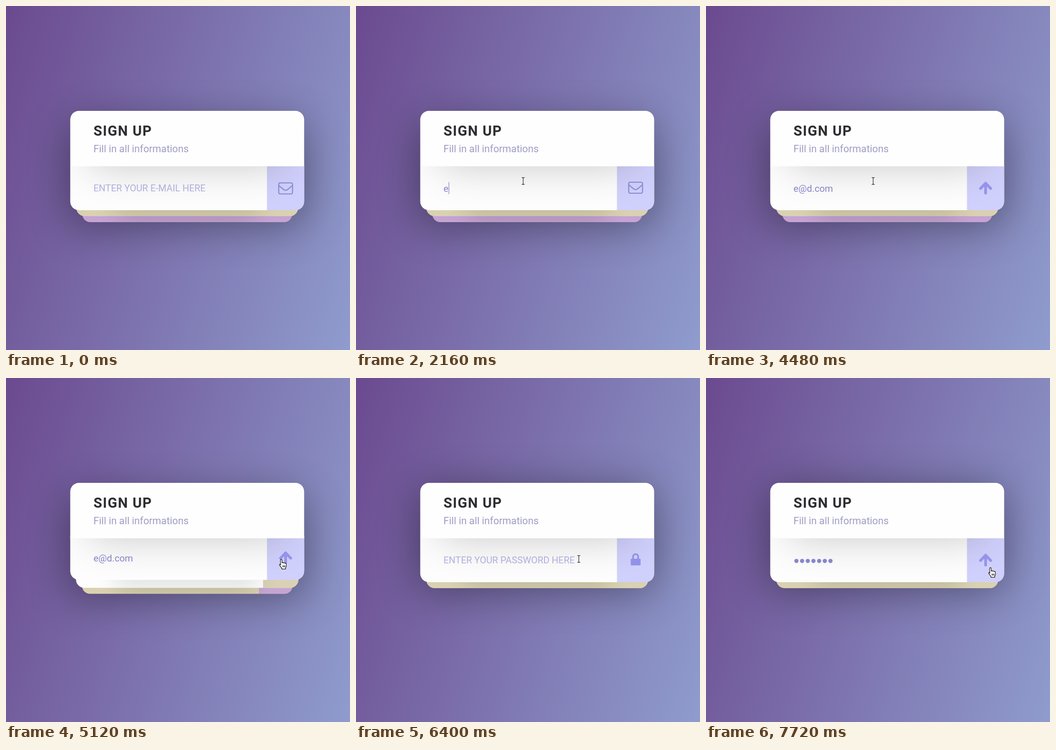
An HTML page that plays this animation: 748x748 px, repeating every 8000 ms.

```html
<!DOCTYPE html>
<html lang="en">
<head>
<meta charset="utf-8">
<title>Sign up form</title>
<style>
  html, body { margin: 0; width: 100%; height: 100%; overflow: hidden; }
  body { background: linear-gradient(107deg, #6b4a8f, #8f9ccd); }
  svg { display: block; width: 100vw; height: 100vh; }
  text { font-family: Roboto, sans-serif; font-size: 20.32px; white-space: pre; }
  .title { font-size: 30.48px; font-weight: 700; letter-spacing: 1.5px; fill: #2d2d31; }
  .sub { font-size: 21.7px; fill: #9f9dc5; }
  .hint { fill: #b6b3e6; }
  .value { fill: #8c88d0; }
  .arrow { fill: none; stroke: #9996ef; stroke-width: 6; stroke-linecap: round; stroke-linejoin: round; }
  .line { fill: none; stroke: #8b90d2; stroke-width: 2.4; }
</style>
</head>
<body>
<svg viewBox="0 0 748 748">
  <defs>
    <filter id="wide" filterUnits="userSpaceOnUse" x="-60" y="0" width="860" height="748"><feGaussianBlur stdDeviation="47"/></filter>
    <filter id="mid" filterUnits="userSpaceOnUse" x="0" y="60" width="800" height="480"><feGaussianBlur stdDeviation="44"/></filter>
    <filter id="soft" filterUnits="userSpaceOnUse" x="-300" y="-150" width="600" height="260"><feGaussianBlur stdDeviation="26"/></filter>
    <!-- panel space: origin at the middle of its bottom edge -->
    <path id="shape" d="M-254.3-96.2H254.3V-19a19 19 0 0 1-19 19H-235.3a19 19 0 0 1-19-19z"/>
    <clipPath id="panelClip"><use href="#shape"/></clipPath>
    <clipPath id="frontClip"><use href="#shape" transform="translate(394 444)"/></clipPath>
    <clipPath id="iconClip"><rect x="173.5" y="-96" width="81" height="96"/></clipPath>
    <g id="up" class="arrow"><path d="M0 10.2V-11M-11 .3L0-11.3 11 .3"/></g>
    <g id="mail" class="line"><rect x="-15" y="-12" width="30" height="24" rx="3"/><path d="M-15-6.5Q-10-2-4 2.6 0 5.6 4 2.6 10-2 15-6.5"/></g>
    <g id="lock"><rect x="-10.6" y="-3.6" width="21.4" height="14.4" rx="1.6" fill="#9493ea"/><path d="M-5.4-3V-8.2a5.4 5.4 0 0 1 10.8 0V-3" fill="none" stroke="#9493ea" stroke-width="3.7"/></g>
  </defs>

  <rect id="cardShadow" x="140" width="508" height="216" filter="url(#wide)" opacity=".42"/>
  <g id="panels"></g>
  <g clip-path="url(#frontClip)"><rect x="182" y="228" width="424" height="120" filter="url(#mid)" opacity=".21"/></g>
  <path d="M139.7 348.4V247a19 19 0 0 1 19-19H629.3a19 19 0 0 1 19 19V348.4z" fill="#fefefe"/>
  <text class="title" x="190.3" y="282.2">SIGN UP</text>
  <text class="sub" x="190.3" y="317.7">Fill in all informations</text>

  <g id="cursor">
    <path id="pointer" d="M0 0V17l4-3.7 2.6 6 2.6-1.1-2.6-5.8h5.4z" fill="#111" stroke="#fff"/>
    <path id="beam" d="M-3.2-7.3H-1Q0-7.3 0-6.3V6.3Q0 7.3-1 7.3H-3.2M3.2-7.3H1Q0-7.3 0-6.3M0 6.3Q0 7.3 1 7.3H3.2" fill="none" stroke-width="1.2"/>
    <path id="hand" d="M-2.2 12.6V2a1.7 1.7 0 0 1 3.4 0V8.5q0-1.6 1.7-1.6t1.6 1.8q.2-1.3 1.6-1.2t1.5 1.8q.3-1 1.4-.9t1.4 1.8v4.6q0 2.4-1.6 4.2v2.4h-8.2v-2l-4.6-6q-1-1.6.2-2.4t2.4.4zM2.9 13.5v4M5.2 13.5v4M7.5 13.5v4" fill="#fff" stroke="#111" stroke-width="1.2" stroke-linejoin="round"/>
  </g>
</svg>
<script>
const LOOP = 8000;
const SWAP = [5092, 5270];
const EMAIL = 'e@d.com';
const WHITE = [252, 253, 252], LILAC = [208, 208, 252], SAND = [217, 209, 177], PINK = [197, 163, 211];
const emailKeys = [2000, 2800, 3600, 3700, 3800, 3900, 4000];
const passKeys = [6520, 6680, 6800, 6920, 7080, 7160, 7240];
const caretOn = [[80, 580], [1080, 1600], [2000, 2480], [2800, 3280], [3600, 4480], [5920, 6400], [6520, 7720]];
const path = [
  [80, 408, -30], [680, 363.5, 383], [1080, 363.5, 383], [1240, 363.5, 380.5],
  [4660, 363.5, 380.5], [5080, 599, 394], [5160, 599, 394], [5260, 594.5, 393.5],
  [5700, 594.5, 393.5], [5720, 597, 389], [5900, 484.5, 393.5],
  [7390, 484.5, 393.5], [7720, 619, 412]
];

const $ = id => document.getElementById(id);
const set = (el, attrs) => { for (const k in attrs) el.setAttribute(k, attrs[k]); };
const show = (el, on) => el.setAttribute('visibility', on ? 'inherit' : 'hidden');
const clamp = v => Math.max(0, Math.min(1, v));
const ease = v => v < .5 ? 2 * v * v : 1 - 2 * (1 - v) * (1 - v);
const span = (t, a, b) => ease(clamp((t - a) / (b - a)));
const mix = (a, b, p) => a + (b - a) * p;
const rgb = (a, b = a, p = 0) => `rgb(${a.map((v, i) => Math.round(mix(v, b[i], p)))})`;
const typed = (keys, t) => keys.filter(k => t >= k).length;

function make(tag, attrs, parent, text) {
  const el = document.createElementNS('http://www.w3.org/2000/svg', tag);
  set(el, attrs);
  if (text) el.textContent = text;
  return parent.appendChild(el);
}

function makePanel(hint, icon) {
  const g = make('g', {}, $('panels'));
  const field = make('use', { href: '#shape' }, g);
  const inner = make('g', { 'clip-path': 'url(#panelClip)' }, g);
  const button = make('rect', { x: 173.5, y: -97, width: 82, height: 98 }, inner);
  const shade = make('rect', { x: -165, y: -60, width: 330, height: 60, filter: 'url(#soft)' }, inner);
  const panel = { g, field, button, shade };
  if (!hint) return panel;
  panel.hint = make('text', { class: 'hint', x: -203.7, y: -40.6 }, g, hint);
  panel.value = make('text', { class: 'value', x: -203.7, y: -40.4 }, g);
  panel.dots = passKeys.map((_, i) =>
    make('circle', { cx: -197.4 + 12.35 * i, cy: -46.2, r: 4.6, fill: '#8c88d0' }, g));
  panel.caret = make('rect', { y: -61, width: 1.2, height: 26, fill: '#8582cc' }, g);
  const box = make('g', { 'clip-path': 'url(#iconClip)' }, g);
  panel.icon = make('use', { href: icon }, box);
  panel.arrow = make('use', { href: '#up' }, box);
  return panel;
}

const third = makePanel();
const pass = makePanel('ENTER YOUR PASSWORD HERE', '#lock');
const email = makePanel('ENTER YOUR E-MAIL HERE', '#mail');

function place(panel, slot, lift = 0) {
  const k = (508.6 - 26.4 * slot) / 508.6;
  set(panel.g, { transform: `translate(394 ${444 + 13 * slot - lift}) scale(${k})` });
  set(panel.shade, { opacity: .12 * Math.min(1, slot) });
}

function slideIcons(panel, p) {
  set(panel.icon, { transform: `translate(214 ${-47.4 - 96 * p})` });
  set(panel.arrow, { transform: `translate(214 ${48.6 - 96 * p})` });
}

function fill(panel, count, width, dots, caret) {
  show(panel.hint, count === 0);
  panel.dots.forEach((d, i) => show(d, dots && i < count));
  set(panel.caret, { x: -203.3 + width });
  show(panel.caret, caret);
}

function moveCursor(t) {
  let i = 0;
  while (i < path.length - 2 && t >= path[i + 1][0]) i++;
  const [a, x0, y0] = path[i], [b, x1, y1] = path[i + 1];
  const p = span(t, a, b), x = mix(x0, x1, p), y = mix(y0, y1, p);
  const resting = t >= 5230 && t < 5710;
  const kind = resting ? 'beam' : x > 567.5 ? 'hand' : y > 348 ? 'beam' : 'pointer';
  set($('cursor'), { transform: `translate(${x} ${y})` });
  for (const id of ['pointer', 'beam', 'hand']) show($(id), id === kind);
  set($('beam'), { stroke: resting ? '#45b565' : '#222' });
}

function draw(t) {
  const p = span(t, ...SWAP), swapped = t >= SWAP[0];
  const blink = caretOn.some(([a, b]) => t >= a && t < b);
  set($('cardShadow'), { y: mix(258, 243, p) });

  place(email, 0, 96 * p);
  place(pass, 1 - p);
  place(third, 2 - p);
  show(email.g, p < 1);
  set(email.field, { fill: rgb(WHITE) });
  set(email.button, { fill: rgb(LILAC) });
  set(pass.field, { fill: rgb(swapped ? WHITE : SAND) });
  set(pass.button, { fill: rgb(SAND, LILAC, p) });
  set(third.field, { fill: rgb(swapped ? SAND : PINK) });
  set(third.button, { fill: rgb(PINK, SAND, p) });

  const n = typed(emailKeys, t), m = typed(passKeys, t);
  email.value.textContent = EMAIL.slice(0, n);
  fill(email, n, n ? email.value.getComputedTextLength() : 0, false, blink && !swapped);
  fill(pass, m, 12.4 * m, true, blink && swapped);
  slideIcons(email, span(t, 2130, 2480));
  slideIcons(pass, span(t, 6640, 6910));
  moveCursor(t);
}

const start = performance.now();
function tick() {
  draw((performance.now() - start) % LOOP);
  requestAnimationFrame(tick);
}
tick();
</script>
</body>
</html>
```
